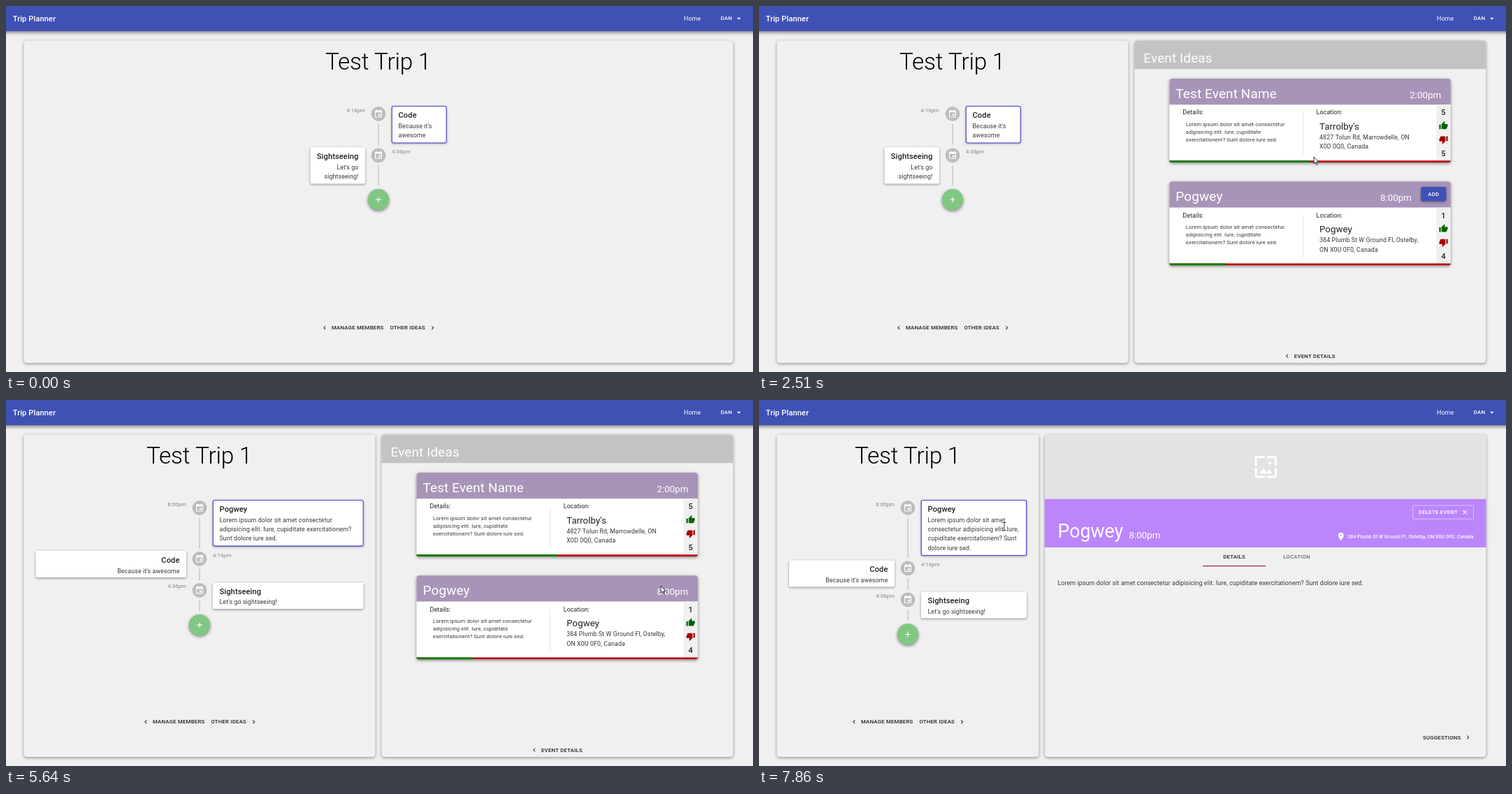
Animation, 1069 px wide and 524 px high, one loop 8000 ms. Source, as an HTML page with a canvas:

```html
<!DOCTYPE html>
<html lang="en">
<head>
<meta charset="utf-8">
<title>Trip Planner</title>
<style>
html, body { margin: 0; width: 100%; height: 100%; overflow: hidden; background: #f0f0f0; }
canvas { display: block; width: 1069px; height: 524px; }
</style>
</head>
<body>
<canvas id="stage"></canvas>
<script>
const W = 1069, H = 524, LOOP = 8000;
const U = W / 1920; // one layout pixel
const canvas = document.getElementById('stage');
const ctx = canvas.getContext('2d');
const dpr = window.devicePixelRatio || 1;
canvas.width = W * dpr;
canvas.height = H * dpr;

const BG = '#f0f0f0', INK = '#212121', BODY = '#383838', DIM = '#858585';
const PRIMARY = '#3f51b5', LILAC = '#a894b8';
const PLACE = 'Pogwey';
const STREET = ['384 Plumb St W Ground Fl, Ostelby,', 'ON X0U 0F0, Canada'];

const icons = {
  event: new Path2D('M17 12h-5v5h5v-5zM16 1v2H8V1H6v2H5c-1.11 0-1.99.9-1.99 2L3 19c0 1.1.89 2 2 2h14c1.1 0 2-.9 2-2V5c0-1.1-.9-2-2-2h-1V1h-2zm3 18H5V8h14v11z'),
  thumb: new Path2D('M1 21h4V9H1v12zm22-11c0-1.1-.9-2-2-2h-6.31l.95-4.57.03-.32c0-.41-.17-.79-.44-1.06L14.17 1 7.59 7.59C7.22 7.95 7 8.45 7 9v10c0 1.1.9 2 2 2h9c.83 0 1.54-.5 1.84-1.22l3.02-7.05c.09-.23.14-.47.14-.73v-2z'),
  picture: new Path2D('M4 4h7V2H4c-1.1 0-2 .9-2 2v7h2V4zm6 9l-4 5h12l-3-4-2.03 2.71L10 13zm7-4.5c0-.83-.67-1.5-1.5-1.5S14 7.67 14 8.5s.67 1.5 1.5 1.5S17 9.33 17 8.5zM20 2h-7v2h7v7h2V4c0-1.1-.9-2-2-2zm0 18h-7v2h7c1.1 0 2-.9 2-2v-7h-2v7zM4 13H2v7c0 1.1.9 2 2 2h7v-2H4v-7z'),
  pin: new Path2D('M12 2C8.14 2 5 5.14 5 9c0 5.25 7 13 7 13s7-7.75 7-13c0-3.86-3.14-7-7-7zm-1.56 10H9v-1.44l3.35-3.34 1.43 1.43L10.44 12zm4.45-4.45l-.7.7-1.44-1.44.7-.7c.15-.15.39-.15.54 0l.9.9c.15.15.15.39 0 .54z'),
  chevron: new Path2D('M10 6L8.59 7.41 13.17 12l-4.58 4.59L10 18l6-6z'),
  plus: new Path2D('M19 13h-6v6h-2v-6H5v-2h6V5h2v6h6v2z'),
  close: new Path2D('M19 6.41L17.59 5 12 10.59 6.41 5 5 6.41 10.59 12 5 17.59 6.41 19 12 13.41 17.59 19 19 17.59 13.41 12z'),
  caret: new Path2D('M7 10l5 5 5-5z')
};
const pointers = {
  arrow: new Path2D('M0 0V9.8L2.2 7.7 3.8 11.2 5.3 10.5 3.8 7.2H6.8Z'),
  hand: new Path2D('M-1 8V1a1 1 0 0 1 2 0v4l1.2-.3 1 .7 1.2-.2.9.8.9.2.5 1v3l-1.2 2.8v1.2h-5.5l-3.4-5 .6-1.2 1 .2z'),
  beam: new Path2D('M-2.5 -5.5h2l.5 .5.5-.5h2M0 -5V5M-2.5 5.5h2l.5-.5.5.5h2')
};

// ---- timing
const clamp = v => Math.min(1, Math.max(0, v));
const span = (t, a, b) => clamp((t - a) / (b - a));
const lerp = (a, b, p) => a + (b - a) * p;

function bezier(x1, y1, x2, y2) {
  const at = (a, b, s) => 3 * a * s * (1 - s) ** 2 + 3 * b * s * s * (1 - s) + s ** 3;
  return x => {
    let lo = 0, hi = 1;
    for (let i = 0; i < 24; i++) {
      const mid = (lo + hi) / 2;
      if (at(x1, x2, mid) < x) lo = mid; else hi = mid;
    }
    return at(y1, y2, (lo + hi) / 2);
  };
}
const ease = bezier(.25, .1, .25, 1);
const easeInOut = bezier(.42, 0, .58, 1);
const easeOut = bezier(.215, .61, .355, 1);

function track(stops, p, curve) {
  let i = 1;
  while (i < stops.length - 1 && p > stops[i][0]) i++;
  const [a, b] = [stops[i - 1], stops[i]];
  return lerp(a[1], b[1], curve(span(p, a[0], b[0])));
}
const bounceIn = p => U * track([[0, 3000], [.6, -25], [.75, 10], [.9, -5], [1, 0]], p, easeOut);
const bounceOut = p => U * track([[0, 0], [.2, -20], [1, 2000]], p, ease);

const path = [
  [130, 1003, 526], [500, 770, 410], [880, 577, 460], [1290, 577, 460],
  [1490, 572.5, 459.5], [2030, 569, 451.5], [2100, 569, 451.5], [2510, 794, 216],
  [2850, 955, 262], [3130, 984, 282], [3400, 974, 271.5],
  [5570, 974, 271.5], [6050, 351, 181]
];
const ADDED = 4500;

// ---- drawing helpers
function shade(alpha, blur, dy) {
  ctx.shadowColor = `rgba(0,0,0,${alpha})`;
  ctx.shadowBlur = blur * dpr;
  ctx.shadowOffsetY = dy * dpr;
}

function box(x, y, w, h, r, fill, shadow) {
  ctx.save();
  if (shadow) shade(...shadow);
  ctx.beginPath();
  ctx.roundRect(x, y, w, h, r);
  ctx.fillStyle = fill;
  ctx.fill();
  ctx.restore();
}

function disc(x, y, r, fill, shadow) {
  box(x - r, y - r, 2 * r, 2 * r, r, fill, shadow);
}

const spacing = { 60: -.00833, 34: .00735, 20: .0075, 16: .00938, 14: .01071, 12: .03333 };

function text(str, x, y, size, fill, { weight = 400, align = 'left', gap = spacing[size] || 0 } = {}) {
  ctx.font = `${weight} ${size * U}px Roboto, sans-serif`;
  ctx.letterSpacing = gap * size * U + 'px';
  ctx.textAlign = align;
  ctx.fillStyle = fill;
  ctx.fillText(str, x, y);
}

function label(str, x, y, fill = INK, align = 'left') {
  text(str, x, y, 14, fill, { weight: 500, gap: .02857, align });
}

function icon(name, x, y, fill, scale = U, turn = 0) {
  ctx.save();
  ctx.translate(x, y);
  ctx.rotate(turn);
  ctx.scale(scale, scale);
  ctx.translate(-12, -12);
  ctx.fillStyle = fill;
  ctx.fill(icons[name], 'evenodd');
  ctx.restore();
}

const chevron = (x, y, back) => icon('chevron', x, y, INK, .47, back ? Math.PI : 0);
const panel = (x, w) => box(x, 49.5, w, 461.5, 4.5, BG, [.42, 4, 1.3]);

function ripple(x, y, w, h, cx, cy, r, fill) {
  ctx.save();
  ctx.beginPath();
  ctx.roundRect(x, y, w, h, 2);
  ctx.clip();
  disc(cx, cy, r, fill);
  ctx.restore();
}

// ---- timeline, drawn around x = 0
function stop(y, bottom, side, inner, outer, time, title, lines, picked) {
  const w = outer - 19, top = y + (picked || side > 0 ? -11 : -11.5);
  const x = side > 0 ? 19 : -outer;
  const align = side > 0 ? 'left' : 'right', other = side > 0 ? 'right' : 'left';
  disc(0, y, 10.4, '#bdbdbd');
  icon('event', 0, y, '#fff');
  ctx.fillStyle = '#bdbdbd';
  ctx.fillRect(-.6, y + 14.3, 1.2, inner);
  text(time, -side * 19, y - 3, 14, DIM, { align: other });
  box(x, top, w, bottom - top, 2.2, '#fff', [.42, 3.5, 1.1]);
  if (picked) {
    ctx.beginPath();
    ctx.roundRect(x + .3, top, w - .6, bottom - top, 2.2);
    ctx.strokeStyle = '#4242d4';
    ctx.lineWidth = 1.1;
    ctx.stroke();
  }
  text(title, side * 28.5, y + 5.3, 20, INK, { weight: 500, align });
  lines.forEach((s, i) => text(s, side * 28.5, y + 20 + i * 13.4, 16, BODY, { align }));
}

function fab(y) {
  disc(0, y, 15.2, '#81c784', [.45, 4, 1.6]);
  icon('plus', 0, y, '#fff');
}

function timeline(t, cx, right) {
  const narrow = t >= 6424;
  ctx.save();
  ctx.translate(cx, 0);
  if (t < ADDED) {
    stop(154.5, 196, 1, 30, 97.5, '4:16pm', 'Code', ["Because it's", 'awesome'], true);
    stop(213.8, 254.5, -1, 29, 97.5, '4:36pm', 'Sightseeing', ["Let's go", 'sightseeing!']);
    fab(277.3);
  } else {
    const half = narrow ? 170 : 234.5;
    const dy = narrow ? 0 : -13.4;
    const lines = narrow
      ? ['Lorem ipsum dolor sit amet', 'consectetur adipisicing elit. Iure,', 'cupiditate exercitationem? Sunt', 'dolore iure sed.']
      : ['Lorem ipsum dolor sit amet consectetur', 'adipisicing elit. Iure, cupiditate exercitationem?', 'Sunt dolore iure sed.'];
    if (narrow) ctx.scale((right - 25.5) / 375, 1);
    stop(154.5, 222.5 + dy, 1, 57 + dy, half, '8:00pm', PLACE, lines, true);
    stop(240.9 + dy, 267.5 + dy, -1, 16, half, '4:16pm', 'Code', ["Because it's awesome"]);
    stop(285.8 + dy, 312.5 + dy, 1, 16, half, '4:36pm', 'Sightseeing', ["Let's go sightseeing!"]);
    fab(335.5 + dy);
  }
  ctx.restore();
}

function trip(t) {
  let right = lerp(1040.5, 528.5, easeInOut(span(t, 1306, 1826)));
  if (t > 6424) right = lerp(528.5, 400.5, easeInOut(span(t, 6424, 6944)));
  const cx = (25.5 + right) / 2;
  panel(25.5, right - 25.5);
  text('Test Trip 1', cx - .5, 90.8, 60, '#000', { weight: 300, align: 'center' });
  timeline(t, cx, right);

  const hover = span(t, 830, 930) * (1 - span(t, 1500, 1750));
  if (hover > 0) box(cx + 11.5, 450, 73.5, 21, 2, `rgba(0,0,0,${.055 * hover})`);
  const fade = 1 - span(t, 1500, 1850);
  if (t > 940 && fade > 0) {
    const r = 25 * easeOut(span(t, 940, 1150));
    ripple(cx + 11.5, 450, 73.5, 21, cx + 42, 461, r, `rgba(0,0,0,${.22 * fade})`);
  }
  chevron(cx - 77, 460.7, true);
  label('MANAGE MEMBERS', cx - 67, 463.2);
  label('OTHER IDEAS', cx + 16.5, 463.2);
  chevron(cx + 77.5, 460.7);
}

// ---- suggestions
function idea(x, y, title, time, share, place, address, up, down) {
  const w = 402.5;
  box(x, y, w, 120, 4, '#fff', [.45, 4.5, 1.5]);
  box(x, y, w, 37.2, [4, 4, 0, 0], LILAC);
  text(title, x + 9, y + 27.7, 34, '#fff');
  text(time.label, x + time.right, y + 28.2, 24, '#fff', { align: 'right' });

  box(x + 382, y + 37.2, 20.5, 80, 0, BG);
  text(up, x + 392.2, y + 52.3, 20, INK, { weight: 500, align: 'center' });
  icon('thumb', x + 392.2, y + 67.3, '#006400');
  icon('thumb', x + 392.2, y + 87.5, '#a80000', U, Math.PI);
  text(down, x + 392.2, y + 110.6, 20, INK, { weight: 500, align: 'center' });

  text('Details:', x + 19, y + 51.3, 16, INK);
  ['Lorem ipsum dolor sit amet consectetur', 'adipisicing elit. Iure, cupiditate', 'exercitationem? Sunt dolore iure sed.']
    .forEach((s, i) => text(s, x + 23.5, y + 67.5 + i * 11.15, 14, BODY));
  box(x + 191, y + 49, .8, 60, 0, '#dcdcdc');
  text('Location:', x + 210.3, y + 51.3, 16, INK);
  text(place, x + 214.7, y + 73, 24, INK);
  address.forEach((s, i) => text(s, x + 214.7, y + 87 + i * 13.4, 16, BODY));

  box(x, y + 117.3, w, 2.7, [0, 0, 3, 3], '#b80c0c');
  box(x, y + 117.3, w * share, 2.7, [0, 0, 0, 3], '#008000');
}

function ideas(t) {
  if (t < 1197 || t > 7183) return;
  const shift = t < 6433 ? bounceIn(span(t, 1197, 2563)) : bounceOut(span(t, 6433, 7183));
  const x = 537.5 + shift;
  if (x > 1060) return;
  const open = t < ADDED;
  panel(x, 503);
  box(x, 49.5, 503, 40.7, [4.5, 4.5, 0, 0], '#c3c3c3');
  text('Event Ideas', x + 13, 80.5, 34, '#fff');
  idea(x + 50, 104, 'Test Event Name', { label: '2:00pm', right: 389 }, .5,
    "Tarrolby's", ['4827 Tolun Rd, Marrowdelle, ON', 'X0D 0Q0, Canada'], '5', '5');
  idea(x + 50, 251.2, PLACE, { label: '8:00pm', right: open ? 346.7 : 389 }, .2,
    PLACE, STREET, '1', '4');
  if (open) {
    const h = span(t, 2860, 3110);
    const fill = `rgb(${lerp(63, 48, h)},${lerp(81, 63, h)},${lerp(181, 159, h)})`;
    box(x + 410, 259, 36, 20.3, 2.2, fill, [.42, 3.5, 1.1]);
    if (t > 4360) {
      ripple(x + 410, 259, 36, 20.3, x + 436, 271, 34 * easeOut(span(t, 4360, 4780)), 'rgba(255,255,255,.3)');
    }
    label('ADD', x + 428, 271.8, '#fff', 'center');
  }
  chevron(x + 218.5, 501, true);
  label('EVENT DETAILS', x + 228.5, 503.5);
}

// ---- event page
function details(t) {
  if (t < 6520) return;
  const x = 409 + bounceIn(span(t, 6520, 7770));
  if (x > 1060) return;
  panel(x, 631.5);
  box(x, 49.5, 631.5, 92.3, [4.5, 4.5, 0, 0], '#e3e3e3');
  icon('picture', x + 316.3, 95.8, '#fff', 1.58);
  box(x, 141.8, 631.5, 69.2, 0, '#bb86fc');

  ctx.beginPath();
  ctx.roundRect(x + 526.5, 151, 87, 19.3, 2);
  ctx.strokeStyle = 'rgba(255,255,255,.6)';
  ctx.lineWidth = .8;
  ctx.stroke();
  label('DELETE EVENT', x + 535, 163.3, '#fff');
  icon('close', x + 601.3, 160.7, '#fff', .46);

  text(PLACE, x + 18.5, 196.7, 48, '#fff');
  text('8:00pm', x + 120.5, 197.5, 24, '#fff');
  icon('pin', x + 423.8, 195.3, '#fff');
  text(STREET.join(' '), x + 613.7, 197.7, 12, '#fff', { weight: 500, align: 'right' });

  label('DETAILS', x + 271, 227, INK, 'center');
  label('LOCATION', x + 360.5, 227, '#6a6a6a', 'center');
  box(x + 226.3, 237, 89.5, 1.2, 0, '#a81d40');
  text('Lorem ipsum dolor sit amet consectetur adipisicing elit. Iure, cupiditate exercitationem? Sunt dolore iure sed.',
    x + 18.5, 265.3, 16, BODY);
  label('SUGGESTIONS', x + 541, 485.5);
  chevron(x + 605.5, 483);
}

function appBar() {
  box(-6, -6, W + 12, 42, 0, PRIMARY, [.5, 5, 2]);
  text('Trip Planner', 9.7, 21.8, 20, '#fff', { weight: 500 });
  text('Home', 970, 21, 16, '#fff');
  label('DAN', 1022.8, 20.4, '#fff');
  icon('caret', 1048.8, 17.9, '#fff');
}

function pointer(t) {
  if (t < 130) return;
  let i = 1;
  while (i < path.length - 1 && t > path[i][0]) i++;
  const [a, b] = [path[i - 1], path[i]];
  const p = span(t, a[0], b[0]), s = p * p * (3 - 2 * p);
  const x = lerp(a[1], b[1], s), y = lerp(a[2], b[2], s);
  const press = (t > 800 && t < 1600) || (t > 2860 && t < ADDED);
  const shape = press ? 'hand' : t > 5930 ? 'beam' : 'arrow';
  ctx.save();
  ctx.translate(x, y);
  ctx.lineJoin = 'round';
  ctx.lineWidth = .9;
  ctx.strokeStyle = '#222';
  ctx.fillStyle = '#fff';
  if (shape !== 'beam') ctx.fill(pointers[shape]);
  ctx.stroke(pointers[shape]);
  ctx.restore();
}

function draw(t) {
  ctx.setTransform(dpr, 0, 0, dpr, 0, 0);
  ctx.fillStyle = BG;
  ctx.fillRect(0, 0, W, H);
  ctx.save();
  ctx.beginPath();
  ctx.rect(0, 0, 1054, H);
  ctx.clip();
  trip(t);
  ideas(t);
  details(t);
  ctx.restore();
  appBar();
  pointer(t);
}

const begin = performance.now();
function tick() {
  draw((performance.now() - begin) % LOOP);
  requestAnimationFrame(tick);
}
tick();
</script>
</body>
</html>
```
